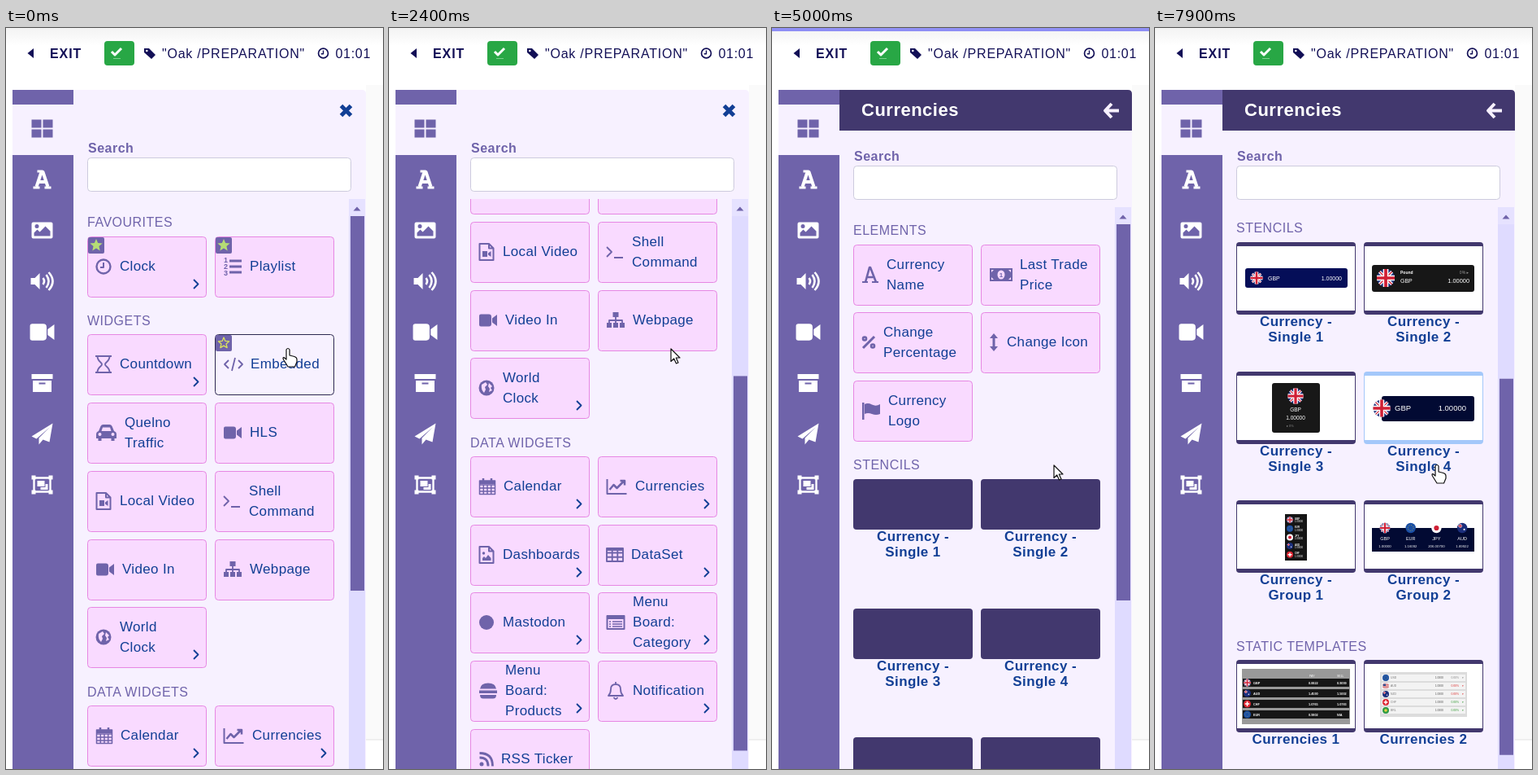
An HTML page that plays this animation: 464x910 px, repeating every 8 s.

```html
<!DOCTYPE html>
<html lang="en">
<head>
<meta charset="utf-8">
<style>
html, body { margin: 0; width: 100%; height: 100%; overflow: hidden; background: #fff; }
svg { display: block; width: 464px; height: 910px; font-family: "Liberation Sans", Arial, sans-serif; }
</style>
</head>
<body>
<svg id="stage" viewBox="0 0 464 910"></svg>
<script>
const PURPLE = '#6f63aa', DARK = '#42386e', PANEL = '#f7f1ff', PINK = '#f9daff', EDGE = '#e687e3',
  BLUE = '#123f95', NAVY = '#120f56', SKY = '#a4c8fa';
const LOOP = 8000, STEP = 100;

// Drawing helpers
const rect = (x, y, w, h, fill, r = 0, more = '') =>
  `<rect x="${x}" y="${y}" width="${w}" height="${h}" rx="${r}" fill="${fill}" ${more}/>`;
const dot = (x, y, r, fill) => `<circle cx="${x}" cy="${y}" r="${r}" fill="${fill}"/>`;
const text = (x, y, size, str, fill, gap = 0, more = '') =>
  `<text x="${x}" y="${y}" font-size="${size}" fill="${fill}" letter-spacing="${gap}" ${more}>${str}</text>`;
const at = (x, y, body, color = PURPLE) => `<g transform="translate(${x} ${y})" color="${color}">${body}</g>`;
const F = d => `<path d="${d}" fill="currentColor" fill-rule="evenodd"/>`;
const S = (d, w = 2) => `<path d="${d}" fill="none" stroke="currentColor" stroke-width="${w}" stroke-linejoin="round"/>`;
const BOLD = 'font-weight="700"', MID = 'text-anchor="middle"', END = 'text-anchor="end"';

const starPath = r => 'M' + Array.from({ length: 10 }, (_, i) => {
  const a = i * Math.PI / 5, k = i % 2 ? r * .45 : r;
  return `${(k * Math.sin(a)).toFixed(2)} ${(-k * Math.cos(a)).toFixed(2)}`;
}).join('L') + 'z';

const FILE = S('M-8.5-10H3L8.5-4.5V10H-8.5zM3-10V-4.5H8.5');
const CAM = F('M-9-7.5H1Q4-7.5 4-4.5V4.5Q4 7.5 1 7.5H-9Q-11 7.5-11 5.5V-5.5Q-11-7.5-9-7.5zM5-2.5L11-7V7L5 2.5z');
const SLAB = S('M-7 9L-1-9H1L7 9M-5 3H5', 4) + S('M-11 10H-3M3 10H11M-6-10H1', 3);
const ICON = {
  clock: S('M-8.5 0a8.5 8.5 0 1 0 17 0a8.5 8.5 0 1 0-17 0', 2.4) + S('M0-5V1H-4'),
  list: S('M-4-7H11M-4 0H11M-4 7H11', 3) + [1, 2, 3].map((n, i) =>
    text(-11, -5 + i * 8, 9, n, 'currentColor', 0, BOLD)).join(''),
  glass: S('M-10-10H10M-10 10H10M-7.5-10C-7.5-3-2-3-2 0S-7.5 3-7.5 10M7.5-10C7.5-3 2-3 2 0S7.5 3 7.5 10', 1.9),
  code: S('M-6-5L-11 0L-6 5M6-5L11 0L6 5M2-8L-2 8', 1.8),
  car: F('M-12.5 2Q-12.5-1-9.5-2L-7-8Q-6-10-4-10H4Q6-10 7-8L9.5-2Q12.5-1 12.5 2V7H10V10H6V7H-6V10H-10V7H-12.5zM-6-2H6L4.5-6.5H-4.5zM-10 2a2 2 0 1 0 4 0a2 2 0 1 0-4 0M6 2a2 2 0 1 0 4 0a2 2 0 1 0-4 0'),
  cam: CAM,
  video: FILE + F('M-5-1H1V6H-5zM2 1.5L5.5-1V6L2 3.5z'),
  term: S('M-10-6L-4 0L-10 6M-1 7H10', 1.8),
  tree: F('M-3.5-10H3.5V-4H-3.5zM-11 3H-5V9H-11zM-3 3H3V9H-3zM5 3H11V9H5z') + S('M0-4V3M-8 3V0H8V3', 1.8),
  globe: dot(0, 0, 9.5, 'currentColor') + `<path d="M-6-4L-1-7L1-4L-2-1L-1 2L-3 6Q-7 2-6-4zM3-6L7-2L5 0L7 3L3 5L4 1L2-2z" fill="${PINK}"/>`,
  calendar: S('M-9.5-7H9.5V9.5H-9.5zM-9.5-2H9.5M-9.5 2H9.5M-9.5 6H9.5M-4.7-2V9.5M0-2V9.5M4.7-2V9.5', 1.5) +
    F('M-9.5-7H9.5V-3H-9.5z') + S('M-5-10V-5M5-10V-5', 2.5),
  chart: S('M-12-9V9H12') + S('M-9 4L-4-2L0 2L8-6M4-7H9.5V-1.5', 2.5),
  picture: FILE + F('M-5 7V4L-3 2L-1 4L2 0L5.5 4V7z') + dot(-3.5, -2, 1.7, 'currentColor'),
  table: S('M-10-8H10V8H-10zM-10-2.5H10M-10 2.7H10M-3.3-7V8M3.3-7V8', 1.9) + F('M-10-9H10V-5H-10z'),
  round: dot(0, 0, 9, 'currentColor'),
  board: S('M-10.5-8H10.5V8H-10.5z') + F('M-11-9H11V-4H-11z') + S('M-8-1H-6M-4-1H8M-8 2H-6M-4 2H8M-8 5H-6M-4 5H8', 1.6),
  burger: F('M-10-2.5Q-9-9.5 0-9.5T10-2.5zM-11-.5H11V3H-11zM-10 5H10Q10 9.5 6 9.5H-6Q-10 9.5-10 5z'),
  bell: S('M-9 6Q-6 3-6-2Q-6-8 0-8T6-2Q6 3 9 6zM0-11V-8', 1.8) + S('M-2.5 8Q0 12 2.5 8', 1.8),
  rss: dot(-6, 6, 2.5, 'currentColor') + S('M-8.5-2Q2-2 2 8.5M-8.5-7.5Q7.5-7.5 7.5 8.5', 2.8),
  letter: S('M-6 9L-1-9H0L7 9M-5 3H4', 2.6) + S('M-10 9H-3M2 9H10'),
  money: F('M-14-8H14V8H-14zM-4.5 0a4.5 5.5 0 1 0 9 0a4.5 5.5 0 1 0-9 0M-12-6V-3L-9-6zM12-6V-3L9-6zM-12 6V3L-9 6zM12 6V3L9 6z') +
    text(0, 3, 8, 1, 'currentColor', 0, BOLD + ' ' + MID),
  percent: S('M7-7L-7 7', 3) + S('M-7-4.5a2 2 0 1 0 4 0a2 2 0 1 0-4 0M3 4.5a2 2 0 1 0 4 0a2 2 0 1 0-4 0', 2.6),
  updown: F('M0-11L5-5H1.5V5H5L0 11L-5 5H-1.5V-5H-5z'),
  flag: F('M-11-10H-8.5V11H-11zM-8-8Q-4-10 1-7.5T11-8V4Q6 6 1 4T-8 4z'),
  grid: F('M-13-11H-1V-1H-13zM1-11H13V-1H1zM-13 1H-1V11H-13zM1 1H13V11H1z'),
  slab: SLAB,
  photo: F('M-11-10H11Q13-10 13-8V8Q13 10 11 10H-11Q-13 10-13 8V-8Q-13-10-11-10zM-10 7H10V1L4-5L-3 2L-6-1L-10 3zM-9-5a2.5 2.5 0 1 0 5 0a2.5 2.5 0 1 0-5 0'),
  sound: F('M-14-4H-9L-3-10V10L-9 4H-14z') + S('M1-4Q4 0 1 4M5-8Q11 0 5 8M8-11Q18 0 8 11', 2.6),
  bigcam: `<g transform="scale(1.36)">${CAM}</g>`,
  box: F('M-13-11H13V-5H-13zM-11.5-3H11.5V11H-11.5zM-4-.5V1.5H4V-.5z'),
  plane: F('M-13 3L13-13L9 10L1 7L-4 13V5L9-8L-7 6z'),
  group: S('M-10-8.5H10V8.5H-10z', 2.4) + F('M-13-11.5H-8V-6.5H-13zM8-11.5H13V-6.5H8zM-13 6.5H-8V11.5H-13zM8 6.5H13V11.5H8zM-6-5H3V2H-6zM4-1H7V6H-2V3H4z')
};

// Widget: column, top, icon, icon centre x, text x, lines, chevron, favourite
const WIDGETS = [
  [0, 256, 'clock', 120, 140, 'Clock', 1, 1], [1, 256, 'list', 279, 300, 'Playlist', 0, 1],
  [0, 376, 'glass', 120, 140, 'Countdown', 1], [1, 376, 'code', 280, 301, 'Embedded'],
  [0, 460, 'car', 123.5, 146, 'Quelno|Traffic'], [1, 460, 'cam', 279, 300, 'HLS'],
  [0, 544, 'video', 120, 140, 'Local Video'], [1, 544, 'term', 278, 299, 'Shell|Command'],
  [0, 628, 'cam', 122, 143, 'Video In'], [1, 628, 'tree', 279, 300, 'Webpage'],
  [0, 711, 'globe', 120, 140, 'World|Clock', 1],
  [0, 832, 'calendar', 121, 141, 'Calendar', 1], [1, 832, 'chart', 280.5, 303, 'Currencies', 1],
  [0, 916, 'picture', 120, 140, 'Dashboards', 1], [1, 916, 'table', 278, 298, 'DataSet', 1],
  [0, 999, 'round', 120, 140, 'Mastodon', 1], [1, 999, 'board', 279, 300, 'Menu|Board:|Category', 1],
  [0, 1083, 'burger', 122, 143, 'Menu|Board:|Products', 1], [1, 1083, 'bell', 279, 300, 'Notification', 1],
  [0, 1167, 'rss', 120, 138, 'RSS Ticker', 1]
];
const ELEMENTS = [
  [0, 266, 'letter', 121, 141, 'Currency|Name'], [1, 266, 'money', 282, 305, 'Last Trade|Price'],
  [0, 349, 'percent', 119, 137, 'Change|Percentage'], [1, 349, 'updown', 273, 289, 'Change Icon'],
  [0, 433, 'flag', 122, 143, 'Currency|Logo']
];

function widget([col, y, icon, ix, tx, label, chevron, fav], hover) {
  const x = 100 + col * 157, lines = label.split('|');
  let out = rect(x + .5, y + .5, 146, 74, hover ? PANEL : PINK, 4, `stroke="${hover ? '#2d2950' : EDGE}"`);
  if (fav || hover) out += rect(x + 1, y + 1, 20, 20, PURPLE, 2) +
    at(x + 11, y + 11, fav ? F(starPath(8)) : S(starPath(7), 1.3), fav ? '#b6dd75' : '#dbe25c');
  out += at(ix, y + 37, ICON[icon]);
  lines.forEach((s, i) => out += text(tx, y + 42.2 + (i - (lines.length - 1) / 2) * 25, 17, s, BLUE, .34));
  return out + (chevron ? at(x + 134, y + 58.5, S('M-3-5.5L2.5 0L-3 5.5', 1.8), BLUE) : '');
}

const heading = (y, s) => text(100, y + 6, 16, s, PURPLE, .5);

// Round flags
function flag(kind, x, y, r) {
  const cross = (c, w, d) => `<path d="${d}" stroke="${c}" stroke-width="${w}"/>`;
  const diag = 'M-.7-.7L.7.7M.7-.7L-.7.7', plus = 'M-1 0H1M0-1V1';
  const art = {
    gb: dot(0, 0, 1, '#1c2f7c') + cross('#fff', .35, diag) + cross('#d01f35', .12, diag) + cross('#fff', .6, plus) + cross('#d01f35', .34, plus),
    eu: dot(0, 0, 1, '#1a4fa5') + `<circle r=".55" fill="none" stroke="#c9b73c" stroke-width=".14" stroke-dasharray=".14 .29"/>`,
    jp: dot(0, 0, 1, '#fff') + dot(0, 0, .5, '#d01f35'),
    au: dot(0, 0, 1, '#1c2f7c') + cross('#fff', .3, 'M-.8-.4H0M-.4-.8V0') + cross('#d01f35', .15, 'M-.8-.4H0M-.4-.8V0') + dot(.4, .3, .17, '#fff'),
    ch: dot(0, 0, 1, '#dc2430') + cross('#fff', .35, 'M-.6 0H.6M0-.6V.6'),
    us: dot(0, 0, 1, '#e8c4ca') + cross('#c33', .2, 'M-.9-.3H.9M-.9.3H.9') + rect(-.8, -.6, .8, .6, '#334a8c'),
    br: dot(0, 0, 1, '#2e9b45') + dot(0, 0, .45, '#e6d546')
  };
  return `<g transform="translate(${x} ${y}) scale(${r})">${art[kind]}</g>`;
}

const white = (x, y, size, s, more) => text(x, y, size, s, '#fff', 0, more);
const ONE = '1.00000';
const ART = [
  () => rect(11, 32, 126, 24, '#050e58', 3) + flag('gb', 25, 44, 7.5) + white(39, 46.5, 7, 'GBP') + white(130, 46.5, 7, ONE, END),
  () => rect(10, 28, 126, 33, '#171717', 3) + flag('gb', 27, 44, 11) + white(45, 39, 5, 'Pound', BOLD) +
    white(45, 50, 7, 'GBP') + white(130, 50, 7.4, ONE, END) + text(129, 39, 5, '0% ▸', '#999', 0, END),
  () => rect(44, 14, 59, 61, '#181818', 3) + flag('gb', 73, 30, 9.5) + white(73, 49, 6.5, 'GBP', MID) +
    white(73, 59, 6.5, ONE, MID) + text(62, 68, 4, '▸  0%', '#888'),
  () => rect(22, 30, 114, 31, '#020a33', 3) + flag('gb', 22, 45, 10.5) + white(38, 48, 9.5, 'GBP') + white(126, 48, 9.5, ONE, END),
  () => rect(60, 17, 27, 57, '#151515') + ['gb', 'eu', 'jp', 'au', 'ch'].map((f, i) =>
    flag(f, 66, 24 + i * 10.7, 4) + white(72, 23.5 + i * 10.7, 2.8, ['GBP', 'EUR', 'JPY', 'AUD', 'CHF'][i], BOLD) +
    white(72, 27 + i * 10.7, 2.8, ONE)).join(''),
  () => rect(10, 34, 126, 29, '#020a33') + ['gb', 'eu', 'jp', 'au'].map((f, i) =>
    flag(f, 26 + i * 31.7, 34, 6.2) + white(26 + i * 31.7, 49, 5.5, ['GBP', 'EUR', 'JPY', 'AUD'][i], MID) +
    white(26 + i * 31.7, 58, 4.3, [ONE, '1.16092', '206.00700', '1.89922'][i], MID)).join(''),
  () => rect(7, 11, 133, 68, '#999') + white(90, 21, 3.5, 'PAY') + white(124, 21, 3.5, 'SELL') +
    ['gb', 'au', 'ch', 'eu'].map((f, i) => rect(8, 23 + i * 13, 131, 10, '#161616') + flag(f, 13.5, 28 + i * 13, 4.5) +
      white(21, 29.5 + i * 13, 3.8, ['GBP', 'AUD', 'CHF', 'EUR'][i], BOLD) +
      white(89, 29.5 + i * 13, 3.8, ['0.8822', '1.4590', '1.0765', '0.9802'][i], BOLD) +
      white(124, 29.5 + i * 13, 3.8, ['0.9099', '1.5002', '1.0783', 'N/A'][i], BOLD)).join(''),
  () => rect(20, 15, 107, 55, '#dcdcdc') + ['eu', 'us', 'au', 'ch', 'br'].map((f, i) => {
    const y = 22 + i * 10, tone = ['#888', '#d33', '#d33', '#393', '#393'][i];
    return rect(22, y - 4, 103, 8, '#f3f3f3') + flag(f, 27, y, 4) + text(33, y + 1.3, 3.4, ['USD', 'AUD', 'NZD', 'CHF', 'BRL'][i], '#777') +
      text(98, y + 1.3, 3.4, '1.0000', '#555', 0, END) + text(117, y + 1.3, 3.4, '0.00%', tone, 0, END) + text(121, y + 1.3, 3.4, '▾', tone);
  }).join('')
];
// Stencil: column, top, label, load time
const STENCILS = [
  [0, 554, 'Currency -|Single 1', 5700], [1, 554, 'Currency -|Single 2', 6800],
  [0, 713, 'Currency -|Single 3', 5800], [1, 713, 'Currency -|Single 4', 7000],
  [0, 871, 'Currency -|Group 1', 7300], [1, 871, 'Currency -|Group 2', 7400],
  [0, 1067, 'Currencies 1', 7400], [1, 1067, 'Currencies 2', 7500]
];

function stencil([col, y, label, loadTime], i, t, hover) {
  const loaded = t >= loadTime, h = loaded ? 89 : 62;
  let out = rect(0, 0, 147, h, hover ? SKY : DARK, 4);
  if (loaded) out += rect(1, 5, 145, 79, '#fff') + ART[i]();
  label.split('|').forEach((s, n) => out += text(73.5, h + 14 + n * 19, 17, s, BLUE, .4, BOLD + ' ' + MID));
  return at(100 + col * 157, y, out);
}

// Motion: linear between [time, value] keys
function tween(keys, t) {
  const n = keys.findIndex(k => k[0] > t);
  if (n === 0) return keys[0][1];
  if (n < 0) return keys[keys.length - 1][1];
  const [t0, a] = keys[n - 1], [t1, b] = keys[n];
  return a + (b - a) * (t - t0) / (t1 - t0);
}
const SCROLL_A = [[700, 0], [800, 10], [1000, 60], [1200, 160], [1300, 190], [1600, 190], [1800, 227], [1900, 260],
  [2000, 260], [2200, 295], [2300, 295], [2600, 328], [2800, 328], [3000, 333]];
const SCROLL_B = [[6400, 0], [6500, 45], [6600, 96], [6800, 130], [7000, 180], [7300, 222], [7600, 222], [7800, 265], [7900, 291]];
const POINTER_Y = [[3100, 394], [3200, 440], [3300, 505], [3400, 526], [3800, 537]];
const SWAP = 4300;

function frame() {
  const side = ['grid', 'slab', 'photo', 'sound', 'bigcam', 'box', 'plane', 'group'];
  return rect(0, 0, 464, 910, '#fff') + rect(0, 0, 464, 22, 'url(#fade)') +
    rect(443, 70, 21, 804, '#fafafa') + rect(443, 873.5, 21, 1, '#e4e4e4') +
    at(31, 31, F('M-4.5 0L3-6V6z'), NAVY) + text(54, 37, 16, 'EXIT', NAVY, .9, BOLD) +
    rect(121, 16, 37, 30, '#28a745', 4) + at(136, 30, S('M-6-1L-2 3L6-5', 3), '#fff') + rect(132, 37, 9, 1, '#79cf8b') +
    at(177, 31, F('M-7-6H-1L7 2L2 7L-7-1zM-5-3a1.3 1.3 0 1 0 2.6 0a1.3 1.3 0 1 0-2.6 0'), NAVY) +
    text(192, 37, 16, '"Oak /PREPARATION"', NAVY, .78) +
    at(390.5, 31, `<g transform="scale(.7)">${ICON.clock}</g>`, NAVY) + text(405.5, 37, 16, '01:01', NAVY, .7) +
    '<path d="M83 76H438Q443 76 443 81V910H83z" fill="' + PANEL + '"/>' +
    rect(8, 76, 75, 834, PURPLE) + rect(8, 94, 75, 62, PANEL) +
    side.map((s, i) => at(44.5, 123.5 + i * 62.5, ICON[s], i ? '#fff' : PURPLE)).join('');
}

function scroller(top, scroll, length, ratio, search) {
  return text(101, search - 6, 16, 'Search', PURPLE, .5, BOLD) +
    rect(100.5, search + .5, 324, 41, '#fff', 4, 'stroke="#cdcbdd"') +
    rect(422, top, 20, 910 - top, '#dfdbff') + rect(422, top, 20, 21, '#e6e2ff') +
    at(432, top + 12, F('M-4.5 2.5L0-2.5L4.5 2.5z')) +
    rect(424, top + 21 + scroll * ratio, 17, length, PURPLE);
}

const HAND = 'M-2 1Q0-2 2 1V8L8 9.5Q11 10.5 11 13V16L8.5 22H0L-5 14Q-7 10.5-5 10.5L-2 13z';
const ARROW = 'M0 0V15.5L3.7 12L6.5 18L9 17L6.3 11H11z';

function draw(t) {
  const py = tween(POINTER_Y, t);
  let out = '', hand;
  if (t < SWAP) {
    const scroll = tween(SCROLL_A, t);
    const hot = t < 2100 ? 'Embedded' : t >= 3300 ? 'Currencies' : '';
    hand = hot;
    out += at(418.5, 101.5, S('M-6-6L6 6M6-6L-6 6', 5), BLUE) + scroller(210, scroll, 460, .642, 159) +
      `<g clip-path="url(#clipA)">` + at(0, -scroll, heading(238, 'FAVOURITES') + heading(359, 'WIDGETS') +
      heading(815, 'DATA WIDGETS') + WIDGETS.map(w => widget(w, w[5] === hot)).join('')) + '</g>';
  } else {
    const scroll = tween(SCROLL_B, t), y = py + scroll;
    const hot = STENCILS.findIndex(s => s[0] && y >= s[1] && y < s[1] + 125);
    hand = hot >= 0;
    out += `<path d="M83 76H438Q443 76 443 81V126H83z" fill="${DARK}"/>` +
      text(110, 108, 22, 'Currencies', '#fff', .5, BOLD) + at(418, 101.5, S('M9 0H-7M0-8.5L-8 0L0 8.5', 4), PANEL) +
      scroller(220, scroll, 462, .652, 169) +
      `<g clip-path="url(#clipB)">` + at(0, -scroll, heading(248, 'ELEMENTS') + heading(536, 'STENCILS') +
      heading(1050, 'STATIC TEMPLATES') + ELEMENTS.map(e => widget(e)).join('') +
      STENCILS.map((s, i) => stencil(s, i, t, i === hot)).join('')) + '</g>';
  }
  // Loading bar
  const bar = tween([[4000, 0], [4900, 464]], t), glow = tween([[5200, 1], [5500, 0]], t);
  out += rect(0, 0, bar, 4, '#8f8ff5', 0, `opacity="${glow}"`);
  out += `<path transform="translate(${347} ${py})" d="${hand ? HAND : ARROW}" fill="#fff" stroke="#111" stroke-width="1.2" stroke-linejoin="round"/>`;
  return out;
}

const stage = document.getElementById('stage');
stage.innerHTML = `<defs><linearGradient id="fade" x2="0" y2="1"><stop stop-color="#f3f3f3"/><stop offset="1" stop-color="#fff"/></linearGradient>
  <clipPath id="clipA"><rect x="84" y="210" width="338" height="700"/></clipPath>
  <clipPath id="clipB"><rect x="84" y="220" width="338" height="690"/></clipPath></defs>${frame()}<g id="live"></g>`;
const live = document.getElementById('live');
let start, shown = -1;
function tick(now) {
  start ??= now;
  const t = Math.floor((now - start) % LOOP / STEP) * STEP;
  if (t !== shown) live.innerHTML = draw(shown = t);
  requestAnimationFrame(tick);
}
live.innerHTML = draw(0);
requestAnimationFrame(tick);
</script>
</body>
</html>
```
